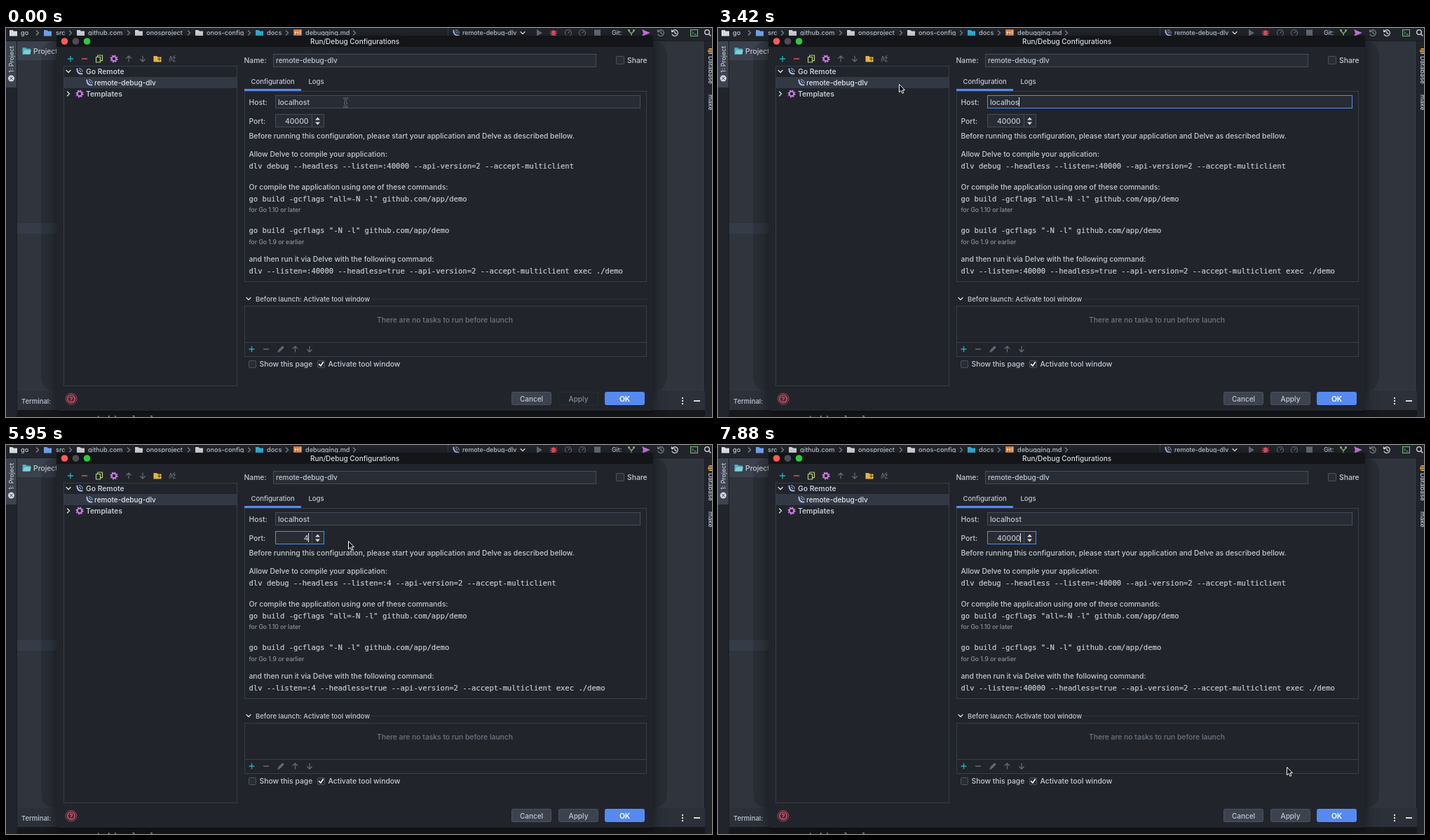
These frames come from a looping animation (1007 by 556 pixels, 8 s). An HTML page:

```html
<!DOCTYPE html>
<html lang="en">
<head>
<meta charset="utf-8">
<title>Run/Debug Configurations</title>
<style>
  html, body { margin: 0; width: 100%; height: 100%; overflow: hidden; background: #282c34; }
  svg { display: block; }
  text { font-family: Inter, Roboto, sans-serif; font-size: 10.33px; font-weight: 500; fill: #c3c9d4; white-space: pre; }
  .mono { font-family: "DejaVu Sans Mono", "Liberation Mono", monospace; font-size: 10.56px; font-weight: 400;
          stroke: #c3c9d4; stroke-width: .2px; }
  .bold { font-weight: 600; }
  .name { font-size: 10px; }
  .tree { font-size: 10px; fill: #e3e6eb; }
  .tab { font-size: 9.5px; }
  .note { font-size: 8.65px; fill: #8a919d; }
  .crumb { font-size: 9.15px; }
  .small { font-size: 8.8px; }
  .line { fill: none; stroke-width: 1.2; stroke-linecap: round; stroke-linejoin: round; }
</style>
</head>
<body>
<svg id="stage" width="1007" height="556" viewBox="0 0 1007 556"></svg>
<script>
const LOOP = 8000;
const WHITE = '#d7dae0', GREY = '#646b78', TEAL = '#16b3bd', RED = '#e0525f',
      PURPLE = '#c678dd', BLUE = '#568af2', EDGE = '#363c47', FIELD = '#282c34',
      RIM = '#464c58', BUTTON = '#3d434e';

// Drawing helpers; text is placed by its vertical centre.
const rect = (x, y, w, h, fill, more = '') =>
  `<rect x="${x}" y="${y}" width="${w}" height="${h}" fill="${fill}" ${more}/>`;
const frame = (x, y, w, h, fill, edge, more = '') =>
  rect(x + .5, y + .5, w - 1, h - 1, fill, `stroke="${edge}" ${more}`);
const disc = (x, y, r, fill, more = '') =>
  `<circle cx="${x}" cy="${y}" r="${r}" fill="${fill}" ${more}/>`;
const text = (x, cy, s, cls = '', more = '') =>
  `<text x="${x}" y="${cy + 3.7}" class="${cls}" ${more}>${s}</text>`;
const at = (x, y, body) => `<g transform="translate(${x} ${y})">${body}</g>`;
const line = (d, color, width = 1.2) =>
  `<path class="line" d="${d}" stroke="${color}" style="stroke-width:${width}"/>`;
const solid = (d, fill) => `<path d="${d}" fill="${fill}"/>`;

const icons = {
  plus: c => line('M-3.5 0H3.5M0 -3.5V3.5', c, 1.4),
  minus: c => line('M-3.5 0H3.5', c, 1.4),
  up: c => line('M0 4V-4M-3.4 -.8L0 -4L3.4 -.8', c),
  down: c => line('M0 -4V4M-3.4 .8L0 4L3.4 .8', c),
  right: c => line('M-1.5 -3L1.5 0L-1.5 3', c, 1.4),
  open: c => line('M-3 -1.5L0 1.5L3 -1.5', c, 1.4),
  folder: c => solid('M-5.5 -4H-1L.5 -2.5H5.5V4.5H-5.5Z', c),
  pencil: c => line('M-4 4L-3.2 1.3L2.3 -4.2L4.2 -2.3L-1.3 3.2Z', c, 1) + line('M-2.5 2.5L3 -3', c, 2),
  gear: c => `<circle r="3.3" fill="none" stroke="${c}" stroke-width="2.2"/>` +
    `<circle r="4.8" fill="none" stroke="${c}" stroke-width="1.7" stroke-dasharray="1.885"/>`,
  remote: c => line('M-3.6 -3.6C-3.6 1 -1 3.6 3.6 3.6', c, 2) +
    line('M-.6 -4.2A5 5 0 0 1 4.2 .4M-.6 -1.6A2.2 2.2 0 0 1 1.6 .6', c, 1),
  copy: c => line('M-4.5 -2.5H1.5V5H-4.5ZM-2.3 -2.7V-5H4.5V2.6H1.7', c),
  clock: c => line('M-4 -1.8A4.4 4.4 0 1 1 -4 2M-4.6 -4.2L-4.2 -1.4L-1.5 -2M0 -2.2V.4L2 1.4', c),
  ring: c => `<circle r="4.5" fill="none" stroke="${c}" stroke-width="1.2"/>` + line('M0 0L2 -2', c)
};
const icon = (name, x, y, c = WHITE) => at(x, y, icons[name](c));

function backdrop() {
  const crumbs = [[5, 'go', WHITE, 21], [54, 'src', '#6f9fe8', 71], [101, 'github.com', WHITE, 117],
    [184, 'onosproject', WHITE, 200], [270, 'onos-config', WHITE, 286], [356, 'docs', '#35b4d8', 372]];
  return rect(0, 0, 1007, 556, FIELD) +
    rect(16, 19, 981, 500, '#2f343d') +
    rect(16, 279, 56, 15, '#363c47') +
    rect(16, 19, 56, 27, '#3b414d') +
    rect(0, 0, 1007, 18, '#21252b') + rect(0, 18, 1007, 1, '#1a1d22') +
    rect(0, 19, 15, 537, '#21252b') + rect(0, 19, 15, 66, '#3d434f') + rect(15, 19, 1, 537, '#1a1d22') +
    rect(997, 19, 10, 537, '#21252b') + rect(996, 19, 1, 537, '#1a1d22') +
    rect(50, 19, 893, 500, '#000', 'rx="20" opacity=".14"') +
    rect(16, 519, 981, 27, '#2b3039') + rect(16, 546, 981, 10, '#16181c') +
    crumbs.map(([x, s, c, tx]) => icon('folder', x + 5.5, 7, c) + text(tx, 6.4, s, 'crumb')).join('') +
    [45, 92, 175, 261, 347, 401, 497].map(x => icon('right', x, 7, '#808793')).join('') +
    rect(410, 2, 12, 9, '#d9813f', 'rx="1"') + line('M412.5 9V5L414.5 7L416.5 5V9M419.5 4.5V9', '#fff', 1) +
    text(427, 6.4, 'debugging.md', 'crumb') +
    rect(630, 0, 1, 12, '#3b414d') + icon('remote', 642, 7, '#a9bce6') +
    text(651, 6.4, 'remote-debug-dlv', 'small') + icon('open', 737, 7) +
    solid('M757 2L765 7L757 12Z', GREY) +
    at(781, 7, line('M-4.5 -3L4.5 4M4.5 -3L-4.5 4M-5 .5H5', RED, 1) + `<ellipse cy=".5" rx="3" ry="4.3" fill="${RED}"/>`) +
    icon('ring', 802, 7, GREY) + icon('ring', 822, 7, GREY) + rect(839, 2.5, 9, 9, GREY) +
    text(864, 6.4, 'Git:', 'small') +
    at(892, 7, line('M0 5V1L-3.5 -2.5M0 1L3.5 -2.5', '#8fc47c') + disc(-3.5, -3.5, 1.4, '#8fc47c') + disc(3.5, -3.5, 1.4, '#8fc47c')) +
    solid('M907 2L919 7L907 12L909 7Z', PURPLE) +
    icon('clock', 934, 7, '#7d8490') + icon('clock', 954, 7) +
    frame(976, 2, 11, 10, 'none', '#6fbf73') + line('M978.5 5L980.5 7L978.5 9M982 9H984.5', '#6fbf73', 1) +
    disc(1000, 6, 3.3, 'none', `stroke="${WHITE}" stroke-width="1.3"`) + line('M1002.5 8.5L1005 11', WHITE, 1.4) +
    at(11.2, 64, '<text class="small" transform="rotate(-90)">1: Project</text>') +
    disc(7.5, 72, 4.5, WHITE) + line('M5.5 70L9.5 74M9.5 70L5.5 74', '#3d434f', 1) +
    at(29, 33, solid('M-5.5 -5H-1L.5 -3.5H6V4.5H-5.5Z', '#4bb4c0') + solid('M-3 -1.5H7L5 4.5H-5Z', '#79d2dc')) +
    text(39, 33, 'Project') +
    disc(1005, 33, 4, '#e2a53c') + rect(1001, 31, 6, 1, '#21252b') + rect(1001, 34, 6, 1, '#21252b') +
    at(1001.5, 40, '<text class="small" transform="rotate(90)">Database</text>') +
    at(1001.5, 95, '<text class="small" transform="rotate(90)">make</text>') +
    text(22, 533, 'Terminal:', 'tab') +
    [529, 533, 537].map(y => disc(965, y, 1.2, WHITE)).join('') + rect(981, 532, 9, 2, WHITE) +
    text(110, 558, 'root-debug-local', 'mono');
}

function button(x, label, fill, edge, color, cls = 'name') {
  return frame(x, 520, 57, 19, fill, edge, 'rx="2"') +
    text(x + 28.5, 530, label, cls, `text-anchor="middle" style="fill:${color}"`);
}

function sidebar() {
  return icon('plus', 92, 44, TEAL) + icon('minus', 112, 44, RED) + icon('copy', 133, 44, '#b9cf78') +
    icon('gear', 154, 44, PURPLE) + icon('up', 175, 44, GREY) + icon('down', 195, 44, GREY) +
    icon('folder', 216, 44, '#e5b445') + line('M216.5 44.5H220.5M218.5 42.5V46.5', '#5a4310', 1) +
    line('M233 46L235 40L237 46M238 42H241.5L238 47.5H241.5M233 48L241 39', GREY, 1) +
    frame(82, 54, 248, 458, 'none', EDGE) + rect(83, 70, 246, 16, '#323844') +
    icon('open', 89, 62) + icon('remote', 105, 62, '#a9bce6') + text(114, 62, 'Go Remote', 'bold') +
    icon('remote', 119, 78, '#a9bce6') + text(126, 78, 'remote-debug-dlv', 'tree') +
    icon('right', 89, 94) + icon('gear', 105, 94, PURPLE) + text(114, 94, 'Templates', 'bold');
}

function form() {
  return text(339.5, 46.5, 'Name:') + frame(381, 37, 461, 19, FIELD, RIM) + text(385, 46.5, 'remote-debug-dlv', 'name') +
    frame(870, 40, 12, 12, FIELD, '#4c525e', 'rx="1.5"') + text(886, 46.5, 'Share') +
    text(349.5, 76.5, 'Configuration', 'tab') + text(431.5, 76.5, 'Logs', 'tab') +
    frame(340, 90, 574, 273, 'none', EDGE) + rect(340, 87, 81, 3, BLUE) +
    text(346.5, 106, 'Host:') + text(346.5, 133, 'Port:') +
    frame(384, 96, 521, 19, FIELD, RIM, 'id="hostBox"') +
    frame(384, 123, 70, 19, FIELD, RIM, 'id="portBox"') +
    rect(436, 124, 1, 17, RIM) +
    solid('M441 131.5L444.5 127.5L448 131.5ZM441 134.5L444.5 138.5L448 134.5Z', WHITE) +
    text(346.5, 154.5, 'Before running this configuration, please start your application and Delve as described bellow.') +
    text(346.5, 180.5, 'Allow Delve to compile your application:') +
    text(346.5, 197, '', 'mono', 'id="debugCmd"') +
    text(346.5, 227, 'Or compile the application using one of these commands:') +
    text(346.5, 244, 'go build -gcflags "all=-N -l" github.com/app/demo', 'mono') +
    text(346.5, 259.7, 'for Go 1.10 or later', 'note') +
    text(346.5, 289.5, 'go build -gcflags "-N -l" github.com/app/demo', 'mono') +
    text(346.5, 305, 'for Go 1.9 or earlier', 'note') +
    text(346.5, 330, 'and then run it via Delve with the following command:') +
    text(346.5, 347, '', 'mono', 'id="execCmd"') +
    icon('open', 346, 387) + text(356, 387, 'Before launch: Activate tool window', 'tab') +
    rect(521, 387, 393, 1, '#2f343d') +
    frame(340, 397, 574, 73, 'none', EDGE) + rect(340, 449, 574, 1, EDGE) +
    text(626, 417, 'There are no tasks to run before launch', '', 'text-anchor="middle" style="fill:#6f7683"') +
    icon('plus', 350.5, 459, TEAL) + icon('minus', 371, 459, GREY) + icon('pencil', 392, 459, GREY) +
    icon('up', 412.5, 459, GREY) + icon('down', 433, 459, GREY) +
    frame(346, 475, 11, 11, FIELD, '#4c525e', 'rx="1.5"') + text(361.5, 480.5, 'Show this page') +
    frame(444, 475, 11, 11, FIELD, '#4c525e', 'rx="1.5"') + line('M446.5 480.5L448.8 483L452.5 477.5', '#fff', 1.5) +
    text(459.5, 480.5, 'Activate tool window');
}

function dialog() {
  return rect(72, 11, 851, 536, '#21252b', 'rx="4" style="filter:drop-shadow(0 4px 8px rgba(0,0,0,.5))"') +
    rect(72, 11, 851, 16, '#131518') +
    disc(83.5, 19, 4.8, '#fc5b57') + disc(99.5, 19, 4.8, '#4b4d52') + disc(115.5, 19, 4.8, '#2dc840') +
    text(497.5, 19.5, 'Run/Debug Configurations', 'name', `text-anchor="middle" style="fill:${WHITE}"`) +
    sidebar() + form() +
    disc(93, 530, 8, '#4a2a35', 'stroke="#8d4351"') + disc(93, 530, 5.2, 'none', 'stroke="#ee6478" stroke-width="1.1"') +
    text(93, 529.8, '?', 'bold', 'text-anchor="middle" style="fill:#ee6478;font-size:8.5px"') +
    button(721, 'Cancel', BUTTON, '#4a505c', '#c3c9d4') +
    `<g id="applyOff">${button(788, 'Apply', '#21252b', '#282d35', '#858c98')}</g>` +
    `<g id="applyOn">${button(788, 'Apply', BUTTON, '#4a505c', '#c3c9d4')}</g>` +
    button(854, 'OK', BLUE, BLUE, '#fff', 'bold');
}

const ARROW = 'M.5 .5V11.8L3.2 9.4L5 13.4L6.8 12.6L5.1 8.7H8.4Z';
const BEAM = 'M-2.5 -6Q0 -6 0 -4.5Q0 -6 2.5 -6M0 -4.5V4.5M-2.5 6Q0 6 0 4.5Q0 6 2.5 6M-1.5 1.5H1.5';

document.getElementById('stage').innerHTML = backdrop() + dialog() +
  '<rect id="mark" fill="#4d78cc"/>' +
  text(388, 106, '', '', 'id="host"') +
  text(431.5, 133, '', '', 'id="port" text-anchor="end"') +
  '<rect id="caret" width="1" height="13" fill="#e6e9ef"/>' +
  `<path id="arrow" d="${ARROW}" fill="#000" stroke="#fff" stroke-linejoin="round"/>` +
  `<g id="beam">${line(BEAM, '#858a92', 2.2)}${line(BEAM, '#15171a', 1)}</g>`;

const ui = {};
document.querySelectorAll('[id]').forEach(e => ui[e.id] = e);

// Step tables: [start ms, value...]
const hostSteps = [[0, 'localhost'], [1940, 'l'], [2230, 'loc'], [2530, 'loca'], [2820, 'local'],
  [3120, 'localh'], [3270, 'localho'], [3420, 'localhos'], [3720, 'localhost']];
const portSteps = [[0, '40000'], [5950, '4'], [6250, '40'], [6400, '400'], [6540, '4000'], [6690, '40000']];
const focusSteps = [[0, ''], [150, 'host'], [5050, 'port']];
const markSteps = [[0, ''], [290, 'host'], [1940, ''], [5050, 'port'], [5950, '']];
const caretSteps = [[0, 0], [150, 1], [890, 0], [1340, 1], [4170, 0], [4610, 1],
  [5650, 0], [5950, 1], [7140, 0], [7430, 1]];
const pointerSteps = [[0, 'beam', 484.5, 106.5], [150, 'beam', 440, 104], [290, 'beam', 290, 92],
  [440, 'beam', 92, 80], [590, 'arrow', 258, 80], [4020, 'arrow', 264, 83], [4170, 'arrow', 290, 93],
  [4310, 'arrow', 326, 107], [4460, 'arrow', 362, 120], [4610, 'beam', 390, 131], [4750, 'beam', 397.5, 134],
  [5050, 'beam', 445, 137], [5200, 'arrow', 488, 137], [7430, 'arrow', 504, 152],
  [7580, 'arrow', 600, 249], [7730, 'arrow', 735, 385], [7880, 'arrow', 811, 460]];

const step = (table, t) => table.findLast(row => row[0] <= t).slice(1);
const set = (el, attrs) => { for (const k in attrs) el.setAttribute(k, attrs[k]); };
const show = (el, on) => el.style.display = on ? '' : 'none';

function draw(t) {
  const [host] = step(hostSteps, t), [port] = step(portSteps, t);
  const [focus] = step(focusSteps, t), [mark] = step(markSteps, t);
  const [kind, x, y] = step(pointerSteps, t);

  ui.host.textContent = host;
  ui.port.textContent = port;
  ui.debugCmd.textContent = `dlv debug --headless --listen=:${port} --api-version=2 --accept-multiclient`;
  ui.execCmd.textContent = `dlv --listen=:${port} --headless=true --api-version=2 --accept-multiclient exec ./demo`;
  for (const name of ['host', 'port'])
    ui[name + 'Box'].setAttribute('stroke', focus === name ? BLUE : RIM);

  const hostWidth = ui.host.getComputedTextLength();
  const portWidth = ui.port.getComputedTextLength();
  show(ui.mark, mark);
  if (mark === 'host') set(ui.mark, { x: 388, y: 99, width: hostWidth, height: 13 });
  if (mark === 'port') set(ui.mark, { x: 431.5 - portWidth, y: 126, width: portWidth, height: 13 });

  const hostCaret = mark === 'host' ? 388 : Math.round(388 + hostWidth - .5);
  set(ui.caret, focus === 'port' ? { x: 431, y: 126 } : { x: hostCaret, y: 99 });
  show(ui.caret, step(caretSteps, t)[0]);

  show(ui.applyOn, t >= 2530);
  show(ui.applyOff, t < 2530);
  for (const name of ['arrow', 'beam']) show(ui[name], name === kind);
  ui[kind].setAttribute('transform', `translate(${x} ${y})`);
}

function tick() {
  draw(performance.now() % LOOP);
  requestAnimationFrame(tick);
}
tick();
</script>
</body>
</html>
```
